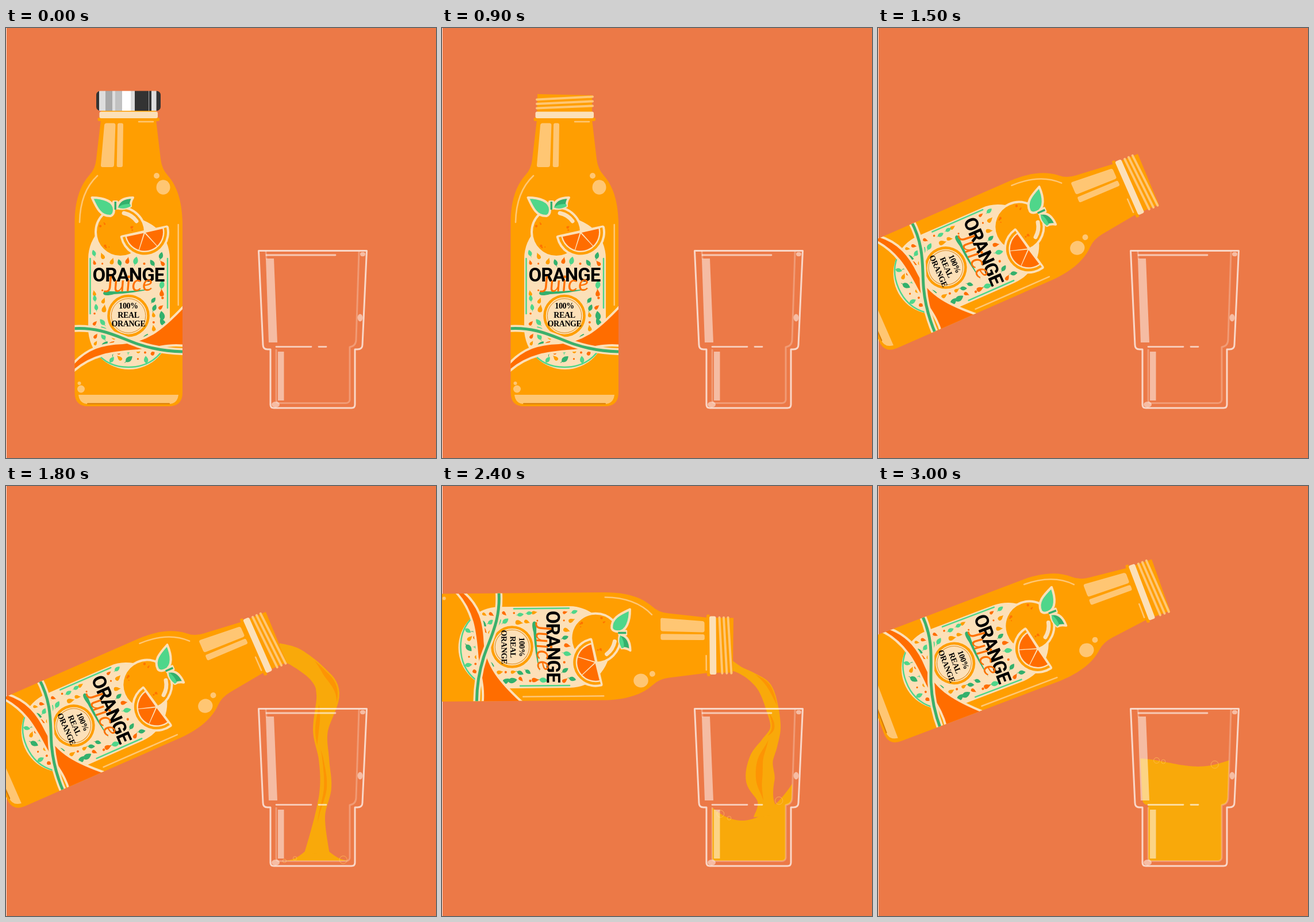
These frames come from a looping animation (748x748 px, 3300 ms). An HTML page:

```html
<!DOCTYPE html>
<html lang="en">
<head>
<meta charset="utf-8">
<title>Orange juice</title>
<style>
html, body { margin: 0; width: 100%; height: 100%; overflow: hidden; background: #ec7947; }
svg { display: block; width: 100vw; height: 100vh; }
.cream { fill: #fce0b8; }
.shine { fill: #ffc673; }
.line { fill: none; stroke-linecap: round; stroke-linejoin: round; }
.mid { text-anchor: middle; }
.title { font: 700 33px Roboto, sans-serif; letter-spacing: -.9px; }
.script { font: italic 400 38px Lato, sans-serif; letter-spacing: 1.5px; }
.badge { font: 700 14px "Liberation Serif", serif; letter-spacing: -.4px; }
</style>
</head>
<body>
<svg viewBox="0 0 748 748" xmlns="http://www.w3.org/2000/svg">
  <defs>
    <path id="body" d="M165 160L157 228Q155.500 245 145 256C128 275 120 302 119.500 337V634Q119.500 658 143 658H283Q307 658 307 634V337C306 302 298 275 281 256Q271 245 269 228L261 160Z"/>
    <path id="wave" d="M114 523C165 519 195 538 230 550C260 560 285 563 312 563"/>
    <clipPath id="inside"><use href="#body"/></clipPath>
    <clipPath id="capShape"><rect x="157" y="109.500" width="112" height="34.500" rx="7"/></clipPath>
    <clipPath id="cavity"><path d="M452 389L460 547Q461 554 470 555V647Q470 652 476 652H591Q597 652 597.500 647V555Q608 554 608.500 543L614 389Z"/></clipPath>
  </defs>
  <rect width="748" height="748" fill="#ec7947"/>
  <rect width="1" height="748" fill="#fbe9e1"/>

  <g id="juice"></g>

  <g id="bottle">
    <use href="#body" fill="#ff9e01"/>
    <path d="M166 115L261 117V160H165Z" fill="#ff9e01"/>
    <rect x="159.500" y="156" width="107.500" height="6" rx="2.500" fill="#ff9e01"/>
    <rect x="162.500" y="145.500" width="101.500" height="11.500" rx="3" class="cream"/>
    <path class="line" stroke="#ffc673" stroke-width="4" d="M165 124.500L262 119.500M165 132L262 127.500M165 139.500L262 135.500"/>
    <g class="shine">
      <path d="M175 165.500H187Q190.500 165.500 190.400 169L188 238Q188 242 184 242H168Q164.500 242 165 238L171 169Q171.500 165.500 175 165.500Z"/>
      <path d="M197 165.500H201Q204 165.500 204 168.500L203 239Q203 242 200 242H195.500Q192.500 242 192.700 239L194 168.500Q194 165.500 197 165.500Z"/>
      <ellipse cx="273.500" cy="277" rx="12" ry="12.800"/>
      <circle cx="262" cy="257" r="5"/>
      <circle cx="130.500" cy="628" r="6.500"/>
      <circle cx="127.500" cy="618" r="3"/>
      <path d="M126 638H300Q298 654 283 654H143Q128 654 126 638Z"/>
    </g>
    <path class="line" stroke="#ffc673" stroke-width="2.600" d="M159 257Q129 285 128 338M299.700 342V482M231 163H256"/>
    <path class="line" stroke="#d97c00" stroke-width="2" d="M142 653.500H284"/>

    <rect x="143" y="330" width="142" height="264" rx="71" class="cream"/>
    <path class="line" stroke="#4fd68a" stroke-width="2.500" d="M146.500 401V497M281 401V487M157 564Q177 590 213 590T270 564"/>
    <g id="deco"></g>

    <g stroke="#fce0b8" stroke-width="4" stroke-linejoin="round">
      <circle cx="199" cy="355" r="43" fill="#ff9e01"/>
      <path fill="#33b06c" d="M187 302H193V314H187Z"/>
      <path fill="#33b06c" d="M193 313C195 300 206 295 221 295Q216 303 217 310Q205 317 193 313Z"/>
      <path fill="#4fd68a" d="M149.500 295C169 295 188 301 188 316Q188 325 182 327C165 328 158 314 149.500 295Z"/>
    </g>
    <path fill="#4fd68a" d="M194 312Q204 305 216 306L217 310Q205 317 194 312Z"/>
    <path fill="#33b06c" d="M188.500 302H192V316H188.500Z"/>
    <g id="freckles" fill="#ff7200"></g>
    <path class="line" stroke="#fce0b8" stroke-width="7" d="M205 322Q219 325 227 336"/>
    <g id="slice" transform="translate(241 355.500) rotate(-12.500)">
      <path class="cream" d="M-43 -1Q-43 -3.500 -39 -3.500H39Q43 -3.500 43 0A43 43 0 0 1 -43 0Z"/>
      <path fill="#ff9e01" d="M-39 0H39A39 39 0 0 1 -39 0Z"/>
      <path class="cream" d="M-34.500 -2H34.500V0A34.500 34.500 0 0 1 -34.500 0Z"/>
    </g>

    <text class="title mid" x="213" y="440.500">ORANGE</text>
    <path fill="#33b06c" d="M171 457.500Q205 460 257 453Q225 461 188 463Q169 468 169 461Z"/>
    <text class="script mid" x="214" y="458" fill="#ff7100" transform="rotate(-2 214 458)">Juice</text>

    <circle cx="213" cy="500.500" r="37.500" class="cream"/>
    <circle cx="213" cy="500.500" r="34.500" fill="none" stroke="#ff9e01" stroke-width="4.500"/>
    <circle cx="213" cy="500.500" r="29.800" fill="none" stroke="#dc8a1c"/>
    <g class="badge mid">
      <text x="213" y="488">100%</text>
      <text x="213" y="503.500">REAL</text>
      <text x="213" y="519">ORANGE</text>
    </g>

    <g clip-path="url(#inside)" class="line">
      <path fill="#ff6d00" stroke="#fce0b8" stroke-width="4" d="M114 587C140 556 170 549 203 548C245 546 275 521 312 481V553C280 549 258 558 230 561C190 564 150 566 114 600Z"/>
      <use href="#wave" stroke="#fce0b8" stroke-width="12"/>
      <use href="#wave" stroke="#3bb06b" stroke-width="5"/>
    </g>
  </g>

  <g id="cap" clip-path="url(#capShape)"></g>

  <g id="glass" fill="#fff">
    <path class="line" stroke="#fff" stroke-opacity=".25" stroke-width="3" d="M614 390L609 542Q609 553 598 555V647Q597 652.500 591 652.500H475Q470 652.500 470 647V560M452 389L453 401"/>
    <path class="line" stroke="#fff" stroke-opacity=".7" stroke-width="3" d="M439.500 387.500H627.500L620 551Q620 559 611 559H607V655Q607 661 601 661H466Q460 661 460 655V559H455Q447 559 447 551Z"/>
    <path class="line" stroke="#fff" stroke-opacity=".6" stroke-width="2.800" d="M453 395H573M470 554.500H531M544 554.500H557"/>
    <g fill-opacity=".5">
      <path d="M452 401H466L472 547H457Z"/>
      <rect x="473" y="563" width="10.500" height="85"/>
      <ellipse cx="620.500" cy="393.500" rx="4.500" ry="3.700"/>
      <ellipse cx="616" cy="504" rx="4.500" ry="6.500"/>
      <ellipse cx="469" cy="655" rx="7" ry="5"/>
    </g>
  </g>
</svg>
<script>
const $ = id => document.getElementById(id);
const STEP = 300, COUNT = 11;
const GREEN = '#4fd68a', DARK = '#33b06c', AMBER = '#ff9e01', RED = '#ff6d00';
const JUICE = '#f9a90a', STREAK = '#fd9404';

function add(parent, tag, attrs) {
  const el = document.createElementNS('http://www.w3.org/2000/svg', tag);
  for (const k in attrs) el.setAttribute(k, attrs[k]);
  return parent.appendChild(el);
}

function seeded(seed) {
  return (lo, hi) => {
    seed = (seed * 16807) % 2147483647;
    return lo + (hi - lo) * seed / 2147483647;
  };
}

const range = (n, fn) => Array.from({ length: n }, (_, i) => fn(i));
const near = (x, y, cx, cy, r) => Math.hypot(x - cx, y - cy) < r;

// Leaves, drops and dots on a jittered grid in the free parts of the label.
function ornaments() {
  const rnd = seeded(77);
  const leaf = 'M0 -9C6 -3 7 4 0 8C-7 4 -6 -3 0 -9ZM-.5 7H.5V11H-.5Z';
  const drop = 'M0 -7C1 -3 4 -1 4 3A4 4 0 0 1 -4 3C-4 -1 -1 -3 0 -7Z';
  const kinds = [[leaf, GREEN], [drop, AMBER], [leaf, DARK], [drop, RED]];
  let count = 0;
  for (let row = 394; row < 590; row += 13)
    for (let col = 155; col < 280; col += 14.5) {
      const x = col + rnd(-2, 2), y = row + rnd(-3, 3);
      const title = y > 411 && y < 446;
      const script = y > 411 && y < 468 && x > 169 && x < 257;
      const outside = y > 523 && !near(x, y, 214, 523, 64);
      if (title || script || outside || near(x, y, 213, 500.5, 43) ||
          near(x, y, 199, 355, 50) || near(x, y, 241, 355, 49)) continue;
      const [d, fill] = kinds[count++ % 4], size = rnd(.6, 1);
      if (count % 5) add($('deco'), 'path', { d, fill, transform: `translate(${x} ${y}) rotate(${rnd(-50, 50)}) scale(${size})` });
      else add($('deco'), 'circle', { cx: x, cy: y, r: 2.5 * size, fill: RED });
    }
}

function fruit() {
  const rnd = seeded(5);
  for (const [x, y] of [[169, 343], [175, 380], [222, 350]])
    for (const r of [2.2, 1.5, 1])
      add($('freckles'), 'circle', { cx: x + rnd(-5, 5), cy: y + rnd(-5, 5), r });
  for (const a of [30, 90, 150])
    add($('slice'), 'path', { d: 'M2 0L28 -15.500A32 32 0 0 1 28 15.500Z', fill: RED, transform: `rotate(${a})` });
}

function metal() {
  let x = 157;
  for (const band of '5#333 11#ddd 12#a8a8a8 5#dedede 12#c1c1c1 15#fff 7#ddd 24#333 1#aaa 4#333 8#ddd 1#999 7#333'.split(' ')) {
    const [width, tone] = band.split('#');
    add($('cap'), 'rect', { x, y: 109, width, height: 36, fill: '#' + tone });
    x += +width;
  }
}

// Point [x, y, half width] on a smooth curve through the keys, t in 0..1.
function along(keys, t) {
  const s = t * (keys.length - 1), i = Math.min(Math.floor(s), keys.length - 2), f = s - i;
  const key = k => keys[Math.max(0, Math.min(keys.length - 1, k))];
  const [a, b, c, d] = [key(i - 1), key(i), key(i + 1), key(i + 2)];
  return b.map((v, k) => v + f / 2 * (c[k] - a[k] +
    f * (2 * a[k] - 5 * v + 4 * c[k] - d[k] + f * (3 * (v - c[k]) + d[k] - a[k]))));
}

// Band between two offsets from the curve; offsets are shares of the half width.
function ribbon(keys, from, to, left, right) {
  const n = 70;
  const edge = off => range(n + 1, i => {
    const t = from + (to - from) * i / n;
    const [x, y, w] = along(keys, t);
    const [x0, y0] = along(keys, Math.max(0, t - .01)), [x1, y1] = along(keys, Math.min(1, t + .01));
    const len = Math.hypot(x1 - x0, y1 - y0), k = w * off(i / n) / len;
    return [x + (y1 - y0) * k, y - (x1 - x0) * k].map(v => v.toFixed(1));
  });
  return 'M' + edge(left).concat(edge(right).reverse()).join('L') + 'Z';
}

const mound = (x, mid, spread) => Math.exp(-(((x - mid) / spread) ** 2));
const bowl = (x, mid, spread) => ((x - mid) / spread) ** 2;

// Each pour: surface height at x, and stream keys [x, y, half width].
const pours = {
  6: {
    top: x => 653 - 28 * mound(x, 541, 30),
    stream: [[472, 287, 14], [504, 298, 16], [543, 328, 16], [560, 362, 20], [547, 425, 13],
      [553, 475, 9], [556, 525, 10], [546, 575, 9], [541, 640, 22]]
  },
  7: {
    top: x => 608 - 26 * mound(x, 548, 30) - (x - 470) * .05,
    stream: [[472, 287, 14], [504, 298, 16], [545, 331, 16], [563, 362, 20], [546, 425, 13],
      [543, 461, 2], [529, 505, 8], [534, 532, 11], [551, 552, 13], [569, 566, 21], [549, 581, 20], [546, 601, 36]]
  },
  8: {
    top: x => 582 - 21 * bowl(x, 522, 50),
    stream: [[495, 308, 10], [518, 320, 6], [541, 333, 8], [562, 352, 12], [574, 385, 11],
      [580, 421, 9], [569, 449, 15], [555, 478, 21], [554, 512, 25], [563, 547, 14], [566, 574, 24]]
  },
  9: {
    top: x => 511 - 20 * bowl(x, 535, 75),
    stream: [[495, 309, 10], [518, 319, 7], [545, 336, 10], [566, 368, 11], [564, 410, 10], [566, 455, 14], [562, 510, 22]]
  },
  10: {
    top: x => {
      const u = Math.max(0, (x - 457) / 154);
      return 474 + 3 * u + 12 * Math.sin(Math.PI * u ** 1.5);
    }
  }
};

function pour({ top, stream }, seed) {
  const g = add($('juice'), 'g', {}), rnd = seeded(seed * 991);
  const surface = range(55, i => [450 + i * 3, top(450 + i * 3).toFixed(1)]);
  add(g, 'path', { d: `M${surface.join('L')}V660H450Z`, fill: JUICE, 'clip-path': 'url(#cavity)' });
  if (stream) {
    add(g, 'path', { d: ribbon(stream, 0, 1, () => 1, () => -1), fill: JUICE });
    for (const [from, to, side] of [[.2, .4, .85], [.42, .56, -.7], [.58, .9, -.3]])
      add(g, 'path', {
        d: ribbon(stream, from, to, () => side, t => side - Math.sign(side) * .5 * Math.sin(Math.PI * t)),
        fill: STREAK
      });
  }
  for (const x of [488, 500, 584]) {
    const cx = x + rnd(-4, 4);
    add(g, 'circle', { cx, cy: top(cx), r: rnd(2.5, 7), fill: 'none', stroke: '#ffc15c', 'stroke-opacity': .7 });
  }
  return g;
}

ornaments();
fruit();
metal();
const groups = Object.entries(pours).map(([step, p]) => [+step, pour(p, +step)]);

// First step of each pose, with the place of the shoulder highlight and the tilt.
const poses = [[0, 274, 277, 0], [4, 323, 328.6, 32.1], [5, 347, 383, 66.3], [8, 346, 339, 89.5], [10, 363, 286, 69.2]];
const capLift = [0, -41, -104];

function draw(time) {
  const step = Math.floor(time / STEP) % COUNT;
  const [, x, y, tilt] = poses.filter(p => p[0] <= step).pop();
  $('bottle').setAttribute('transform', `translate(${x} ${y}) rotate(${tilt}) translate(-274 -277)`);
  $('cap').setAttribute('display', step < capLift.length ? 'inline' : 'none');
  $('cap').setAttribute('transform', `translate(0 ${capLift[step] || 0})`);
  for (const [at, g] of groups) g.setAttribute('display', at === step ? 'inline' : 'none');
}

function tick() {
  draw(performance.now());
  requestAnimationFrame(tick);
}
tick();
</script>
</body>
</html>
```
